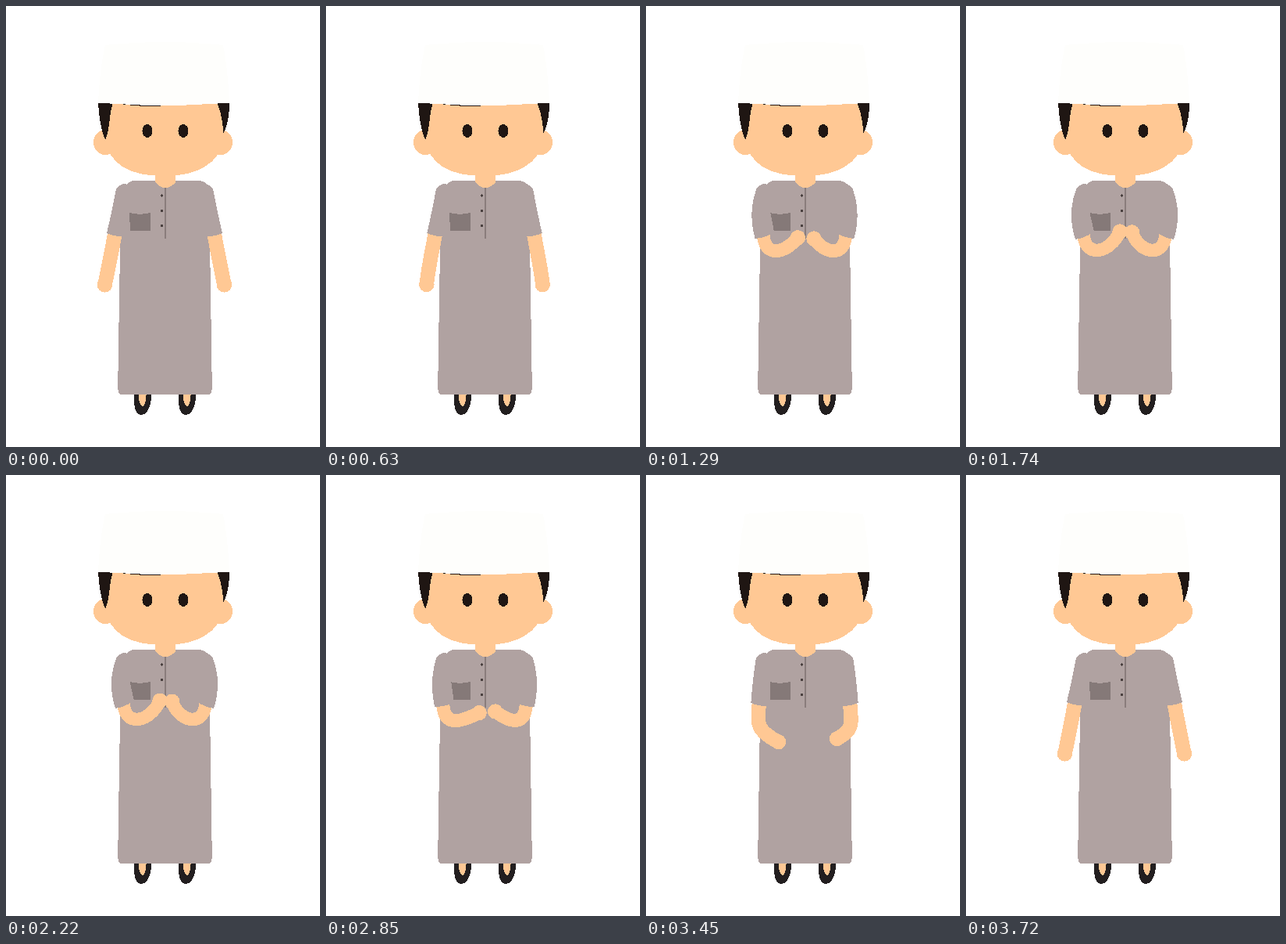
Recreate the animation shown at these times as an HTML page. Size 402 by 563 pixels, loop 3.75 s.

```html
<!DOCTYPE html>
<html lang="en">
<head>
<meta charset="utf-8">
<title>Raised hands</title>
<style>
  html, body { margin: 0; width: 100%; height: 100%; overflow: hidden; background: #fff; }
  svg { display: block; width: 402px; height: 563px; shape-rendering: crispEdges; }
  .skin, .hand { fill: #ffc894; }
  .robe { fill: #b0a2a1; }
  .dark { fill: #1f1613; }
  .limb { fill: none; stroke: #ffc894; stroke-linecap: round; }
</style>
</head>
<body>
<svg viewBox="0 0 402 563">
  <defs>
    <g id="foot">
      <path fill="#231f20" d="M164 493C163 510 165 522 173 522C182 522 187 508 186 493Z"/>
      <path class="skin" d="M169.500 493C169 503 172 511 174.500 511C178 511 180 503 179.500 493Z"/>
    </g>
  </defs>

  <use href="#foot"/>
  <use href="#foot" x="57"/>

  <path class="robe" d="M163 223H247Q254 223.500 258 228L261 300L263.800 486Q263.800 496 259 496H148Q143.200 496 143.200 486L146.200 300L155 228Q157 224 163 223Z"/>
  <path fill="#857978" d="M158 264Q171.500 267.500 185 264V286.500Q171.500 288 159 287Z"/>
  <path d="M204 230V297" stroke="#8a7d7c" stroke-width="1.400"/>
  <g fill="#4a4140">
    <circle cx="199.500" cy="242" r="1.700"/>
    <circle cx="199.500" cy="261.500" r="1.700"/>
    <circle cx="199.500" cy="280.500" r="1.700"/>
  </g>

  <g class="arm"><path class="limb"/><circle class="hand" r="9.700"/><path class="robe"/></g>
  <g class="arm" transform="matrix(-1 0 0 1 406 0)"><path class="limb"/><circle class="hand" r="9.700"/><path class="robe"/></g>

  <g class="skin">
    <path d="M191 210H217V225Q211 232 204 232Q197 232 191 225Z"/>
    <ellipse cx="127" cy="174" rx="15" ry="16"/>
    <ellipse cx="275" cy="174" rx="15" ry="16"/>
    <path d="M126 120H280V165C276 201 245 217 203 217C160 217 130 204 126 165Z"/>
  </g>
  <g class="dark">
    <path d="M118 122H137C132 138 133 158 127.500 170.500C123 164 119 144 118 122Z"/>
    <path d="M270 122H286C286 140 284 152 278 163.500C278 150 276 138 270 122Z"/>
    <path d="M150 122H198V127.600Q178 129 150 125.500Z"/>
    <ellipse class="eye" cx="181" cy="159.500" rx="6.500"/>
    <ellipse class="eye" cx="227" cy="159.500" rx="6.500"/>
  </g>
  <path fill="#fefefc" d="M118 124Q120 80 127 50Q203 42 278 50Q284 80 286 124C260 124.500 235 127 203 127.300C170 127.500 150 124.500 118 124Z"/>
</svg>

<script>
const LOOP = 3750, STEP = 30;
const RISE = 480, RAISED = 1530, FALL = 2070, REST = 3720;
const BLINKS = [765, 3135];

// Each part bends along a curve: lowered, pull point, raised.
const rig = {
  hemOut: [[129, 290], [137.4, 290], [140, 298]],
  hemIn: [[150, 294], [158.4, 297], [161, 290]],
  bulge: [[135, 265], [139, 265], [129.5, 265]],
  chest: [[152, 262], [166, 262], [158, 262]],
  side: [[152, 288], [164, 288], [164, 288]],
  elbow: [[136, 310], [148, 318], [153, 322]],
  wrist: [[131, 334], [131, 318], [184, 316]],
  width: [[18.6], [18.6], [16.5]]
};

// Hand paths; the pull point differs on the way up and down.
const lowered = [126.5, 356];
const reach = [
  { top: [197, 288], up: [180, 345], down: [200, 342] },
  { top: [193.5, 289], up: [177, 348], down: [183.5, 333] }
];

const clamp = (v, lo, hi) => Math.min(hi, Math.max(lo, v));
const bend = ([a, b, c], p) =>
  a.map((v, i) => (1 - p) ** 2 * v + 2 * p * (1 - p) * b[i] + p * p * c[i]);
const easeInOut = u => u < 0.5 ? 0.5 * (2 * u) ** 2.5 : 1 - 0.5 * (2 - 2 * u) ** 2.5;

function lift(t) {
  return t < FALL
    ? easeInOut(clamp((t - RISE) / (RAISED - RISE), 0, 1))
    : 1 - clamp((t - FALL) / (REST - FALL), 0, 1) ** 2.5;
}

const arms = [...document.querySelectorAll('.arm')].map(g => [...g.children]);
const eyes = document.querySelectorAll('.eye');

function drawArm([limb, hand, sleeve], pose, [hx, hy]) {
  const { hemOut, hemIn, bulge, chest, side, elbow, wrist, width } = pose;
  const mx = (hemOut[0] + hemIn[0]) / 2, my = (hemOut[1] + hemIn[1]) / 2;
  limb.setAttribute('d', `M${mx} ${my - 2}C${elbow} ${wrist} ${hx} ${hy}`);
  limb.setAttribute('stroke-width', width);
  hand.setAttribute('cx', hx);
  hand.setAttribute('cy', hy);
  sleeve.setAttribute('d', `M156 228Q151 226 148 228Q142 230 140.5 236Q${bulge} ${hemOut}` +
    `Q${mx} ${my + 2.5} ${hemIn}L${side}L${chest}L160 232Z`);
}

function draw(now) {
  const t = Math.floor((now % LOOP) / STEP) * STEP;
  const p = lift(t);
  const pose = Object.fromEntries(Object.entries(rig).map(([part, path]) => [part, bend(path, p)]));
  arms.forEach((arm, i) => {
    const { top, up, down } = reach[i];
    drawArm(arm, pose, bend([lowered, t < FALL ? up : down, top], p));
  });
  const open = Math.min(...BLINKS.map(b => clamp(Math.abs(t - b) / 60, 0.1, 1)));
  eyes.forEach(eye => eye.setAttribute('ry', 8.5 * open));
}

const start = performance.now();
function tick() {
  draw(performance.now() - start);
  requestAnimationFrame(tick);
}
tick();
</script>
</body>
</html>
```
